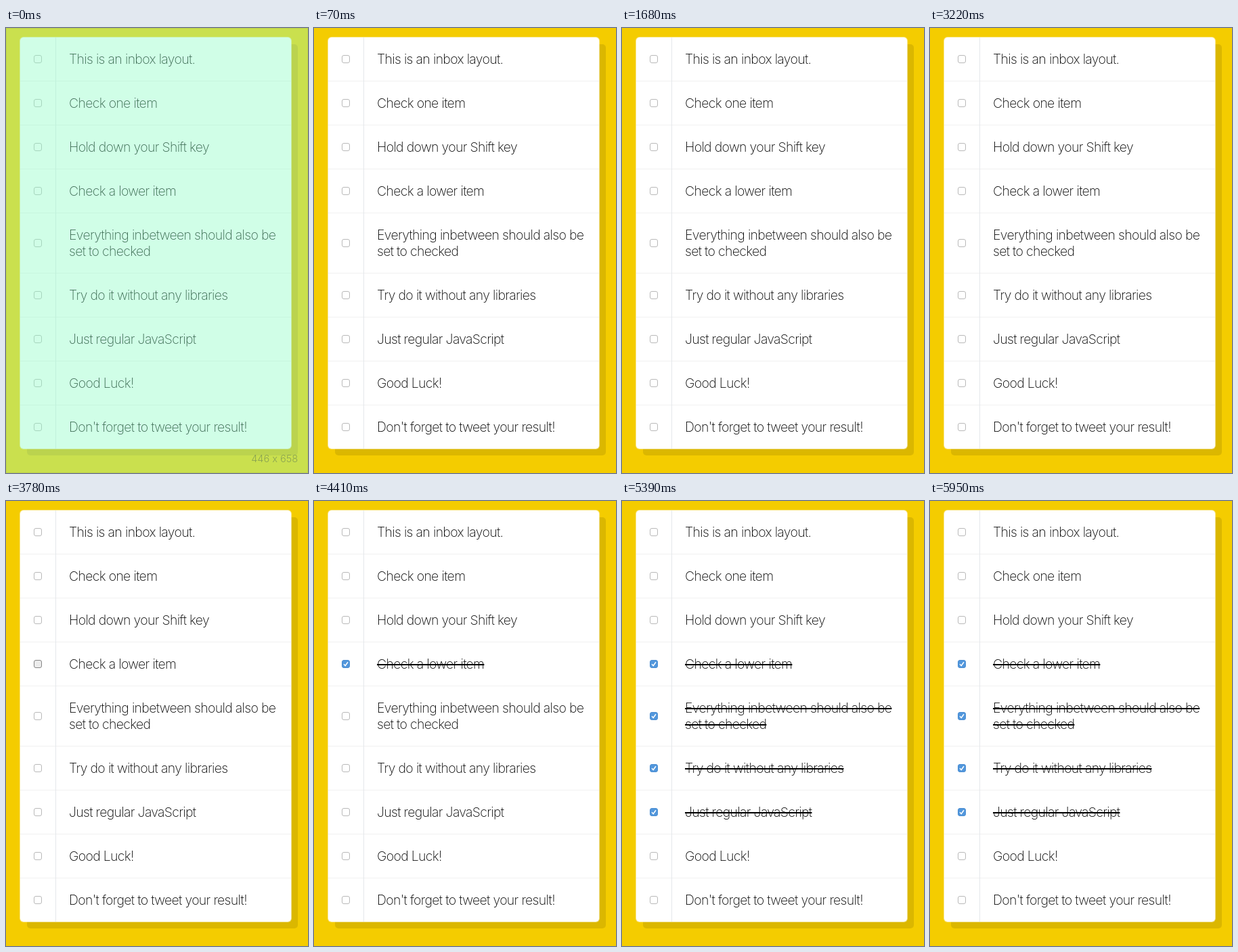
Write an HTML page that moves like this. It is 446 px wide and 658 px high and loops after 6.3 s.

```html
<!DOCTYPE html>
<html lang="en">
<head>
<meta charset="utf-8">
<title>Hold Shift to check</title>
<style>
html, body { margin: 0; width: 446px; height: 658px; overflow: hidden; }
body { position: relative; background: #f4cc00; font: 200 19.4px/24px Inter, Roboto, sans-serif; letter-spacing: -0.64px; color: #000; }
.inbox { position: absolute; left: 21px; top: 14px; width: 400px; height: 608px; background: #fff; border-radius: 5px; box-shadow: 0 0 0 1px rgba(255, 255, 255, .5), 10px 10px 0 rgba(0, 0, 0, .1); }
.item { position: relative; height: 64px; border-bottom: 1px solid #f1f1f1; }
.item.tall { height: 88px; }
.item:last-child { border: 0; }
.item p { position: absolute; left: 52px; top: 0; bottom: 0; margin: 0; padding: 20px 0 0 19px; border-left: 1px solid #e4e8ea; white-space: nowrap; }
.item:not(:last-child) p { bottom: -1px; }
.box { position: absolute; left: 20px; top: 50%; width: 10px; height: 10px; margin-top: -6px; border: 1px solid #b9b9b9; border-radius: 3px; background: #fff; }
.pressed .box { background: #ececec; border-color: #858585; }
.checked .box { background: #5297dc; border-color: #4a8dd2; }
.box svg { display: none; position: absolute; left: 0; top: 0; }
.checked .box svg { display: block; }
.checked p { text-decoration: line-through; text-decoration-thickness: 1.5px; }
.tint { position: absolute; inset: 0; background: rgba(137, 253, 195, .4); box-shadow: inset 0 0 0 1px rgba(0, 0, 0, .06); }
.tint span { position: absolute; right: 15px; bottom: 9px; font-size: 14.5px; font-weight: 300; letter-spacing: 0; color: #8aa352; }
</style>
</head>
<body>
<div class="inbox"></div>
<div class="tint"><span>446 x 658</span></div>
<script>
const LOOP = 6300;
const TINT_END = 70;
const FIRST = { item: 3, press: 3780, check: 3850 };
const SHIFT = { item: 6, press: 5040, check: 5110 };
const labels = [
  "This is an inbox layout.",
  "Check one item",
  "Hold down your Shift key",
  "Check a lower item",
  "Everything inbetween should also be<br>set to checked",
  "Try do it without any libraries",
  "Just regular JavaScript",
  "Good Luck!",
  "Don't forget to tweet your result!"
];
const tick = '<svg width="10" height="10"><path d="M2 5.2 4.2 7.5 8 2.2" fill="none" stroke="#fff" stroke-width="1.5"/></svg>';

const inbox = document.querySelector(".inbox");
const tint = document.querySelector(".tint");
const items = labels.map(text => {
  const el = document.createElement("div");
  el.className = text.includes("<br>") ? "item tall" : "item";
  el.innerHTML = `<span class="box">${tick}</span><p>${text}</p>`;
  inbox.append(el);
  return el;
});

const isPressed = (click, i, t) => i === click.item && t >= click.press && t < click.check;

function isChecked(i, t) {
  if (t >= SHIFT.check) return i >= FIRST.item && i <= SHIFT.item;
  return i === FIRST.item && t >= FIRST.check;
}

function draw(t) {
  tint.style.display = t < TINT_END ? "block" : "none";
  items.forEach((el, i) => {
    el.classList.toggle("pressed", isPressed(FIRST, i, t) || isPressed(SHIFT, i, t));
    el.classList.toggle("checked", isChecked(i, t));
  });
}

const start = performance.now();
function frame() {
  draw((performance.now() - start) % LOOP);
  requestAnimationFrame(frame);
}
draw(0);
requestAnimationFrame(frame);
</script>
</body>
</html>
```
